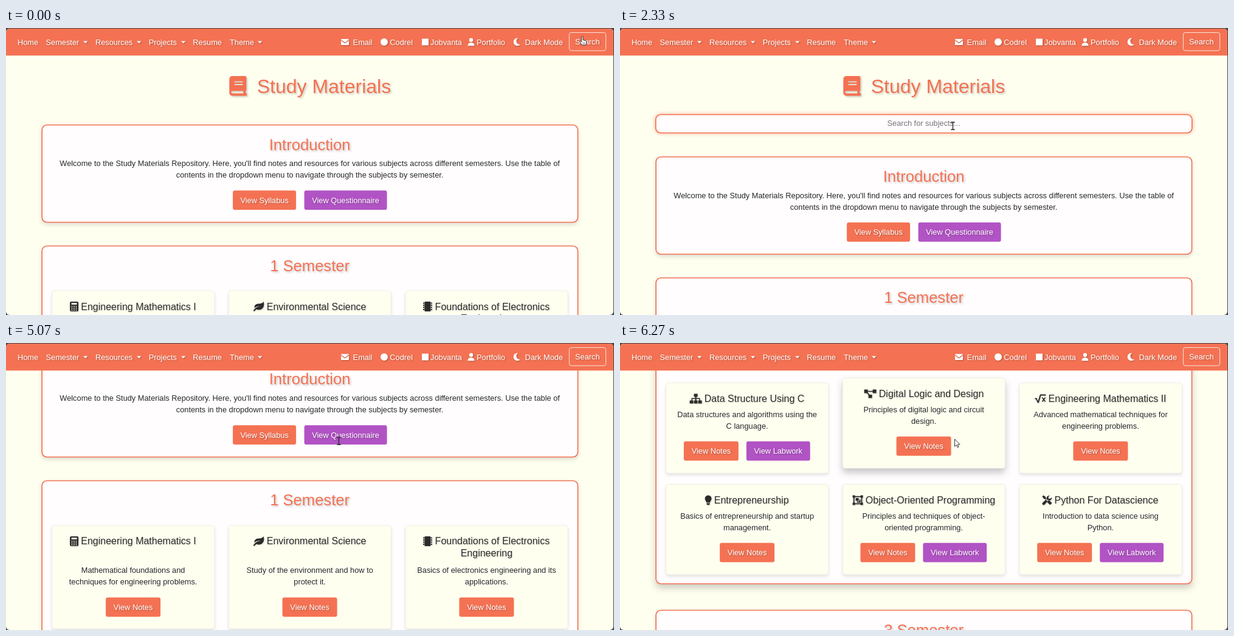
Recreate the animation shown at these times as an HTML page. Size 1000 by 472 pixels, loop 6340 ms.

```html
<!DOCTYPE html>
<html lang="en">
<head>
<meta charset="utf-8">
<title>Study Materials</title>
<style>
  html, body { margin: 0; width: 100%; height: 100%; overflow: hidden; background: #4b4644; }
  svg { display: block; width: 1000px; height: 472px; font: 12.8px "Liberation Sans", Arial, sans-serif; }
  path { fill-rule: evenodd; }
  .mid { text-anchor: middle; }
  .heading { font-size: 25.6px; fill: #f47152; filter: drop-shadow(2px 2px 1.5px rgba(0,0,0,.2)); }
  .big { font-size: 32px; }
  .copy { fill: #26282b; }
  .title { font-size: 16px; fill: #2b2b2b; filter: drop-shadow(1px 1px 1px rgba(0,0,0,.16)); }
  .light { fill: #fff; filter: drop-shadow(1px 1px 1px rgba(0,0,0,.28)); }
  .panel { fill: #fffdfe; stroke: #f47253; stroke-width: 1.7; filter: drop-shadow(0 3px 3px rgba(0,0,0,.14)); }
  .card { fill: #fffff0; stroke: #ecebe0; stroke-width: .8; filter: drop-shadow(0 3px 2.5px rgba(0,0,0,.1)); }
</style>
</head>
<body>
<svg id="stage" viewBox="0 0 1000 472"></svg>
<script>
const LOOP = 6340, FRAME = 1000 / 15;
const ORANGE = '#f47253', PURPLE = '#b153c4';
const SEARCH_SPACE = 52.5;
const CENTER = 499.6;
const COLUMNS = [CENTER - 290.5, CENTER, CENTER + 290.8];

const squares = (xs, ys, size) =>
  xs.map(x => ys.map(y => `M${x} ${y}h${size}v${size}h-${size}z`).join('')).join('');

// Each icon: width, path
const ICONS = {
  book: [28, 'M5 0H26a2 2 0 012 2V22a2 2 0 01-1 2v4a2 2 0 010 4.5H5a5 5 0 01-5-5V5a5 5 0 015-5zM8 8.5v2h14v-2zM8 13v2h14v-2zM5 24.4a2 2 0 000 4H23v-4z'],
  envelope: [13, 'M1 0H12a1 1 0 011 1L6.5 6 0 1a1 1 0 011-1zM0 2.6L6.5 7.4 13 2.6V9a1 1 0 01-1 1H1a1 1 0 01-1-1z'],
  disc: [12, 'M6 0a6 6 0 010 12 6 6 0 010-12z'],
  square: [11, 'M0 0h11v11H0z'],
  user: [11, 'M5.5 0a3.2 3.2 0 010 6.4 3.2 3.2 0 010-6.4zM0 12.8a4.6 4.6 0 014.6-5.2h1.8a4.6 4.6 0 014.6 5.2z'],
  moon: [11, 'M6.5 0A6.4 6.4 0 1011.5 10.5 5.6 5.6 0 017.5.3z'],
  calculator: [14, 'M2 0h10a2 2 0 012 2v12a2 2 0 01-2 2H2a2 2 0 01-2-2V2a2 2 0 012-2zM2.5 2v3h9V2z' + squares([2.5, 6, 9.5], [7, 10, 13], 1.8)],
  leaf: [18, 'M17 0C19 6 17 13 10 13.5c-2 .2-3.5-.3-4.6-1C4 13.5 3 14.5 2 16L0 15C3 10 7 8 12 7.5 8 7 4 8 2 10.5 1.5 6 4.5 4 8 3.6 12 3.4 15 3 17 0z'],
  chip: [16, 'M4 0h8a1 1 0 011 1v14a1 1 0 01-1 1H4a1 1 0 01-1-1V1a1 1 0 011-1z' + squares([.6, 13.4], [1.5, 5, 8.5, 12], 2)],
  sitemap: [20, 'M7 0h6v5h-2v2h6v4h3v5h-6v-5h1.5V8.5H11V11h2v5H7v-5h2V8.5H4.5V11H6v5H0v-5h3V7h6V5H7z'],
  diagram: [20, 'M0 1h6v2.2h8V1h6v6h-6V4.8H6V6l3 3.5h4V15H7v-5L4.3 7H0z'],
  root: [18, 'M0 7h3l2 5L8.5 1H18v2H10L6.3 15H4.5L1.8 9H0zM11 6h2l1.5 2L16 6h2l-2.5 3.5L18 13h-2l-1.5-2-1.5 2h-2l2.5-3.5z'],
  bulb: [11, 'M5.5 0a5.5 5.5 0 015.5 5.5c0 3-2.3 3.6-2.6 6.5H2.6C2.3 9.1 0 8.5 0 5.5A5.5 5.5 0 015.5 0zM2.6 13h5.8a2.9 2.9 0 01-5.8 0z'],
  group: [17, 'M0 0h4v1.2h9V0h4v4h-1.2v8H17v4h-4v-1.2H4V16H0v-4h1.2V4H0zM3 4v8h1v1h9v-1h1V4h-1V3H4v1zM5 4.5h5V9H5zM11 7h2v5H7v-2h4z'],
  tools: [16, 'M0 2L2 0 6 3v2l3 3 2-.5 5 5.2-3 3L7.8 11 8 9 5 6H3zM15.8 3.5A4.5 4.5 0 0110 8.2L4 15.2a2.2 2.2 0 01-3.2-3.2L7.5 6A4.5 4.5 0 0112.3.2L10.2 2.6v3h3z']
};

const icon = (name, x, y) => `<path transform="translate(${x} ${y})" d="${ICONS[name][1]}"/>`;
const text = (x, y, content, style = '') => `<text x="${x}" y="${y}" class="${style}">${content}</text>`;
const box = (x, y, w, h, r, attrs) => `<rect x="${x}" y="${y}" width="${w}" height="${h}" rx="${r}" ${attrs}/>`;
const button = (cx, y, w, label, color = ORANGE) =>
  box(cx - w / 2, y, w, 31.7, 3.2, `fill="${color}"`) + text(cx, y + 20.3, label, 'mid light');

// Card texts are placed around the card's centre line, y runs from the card's top
function card({ col, y, h = 148.5, mark, left, title, copy, lab, id = '' }) {
  const copyTop = h > 150 ? 78.3 : 56;
  const buttonTop = copyTop + 40.2;
  return `<g transform="translate(${COLUMNS[col]} ${y})"><g id="${id}">
    ${box(-133.3, 0, 267, h, 4, 'class="card"')}
    <g class="title">${icon(mark, left, 18)}${text(left + ICONS[mark][0] + 4.2, 31.5, title[0])}
    ${title[1] ? text(0, 50.7, title[1], 'mid') : ''}</g>
    ${copy.map((line, i) => text(0, copyTop + i * 19.2, line, 'mid copy')).join('')}
    ${button(lab ? -59.2 : 0, buttonTop, 90, 'View Notes')}
    ${lab ? button(51.2, buttonTop, 104.8, 'View Labwork', PURPLE) : ''}
  </g></g>`;
}

function panel(y, h, heading, content = '', id = '') {
  return `<g transform="translate(0 ${y})">${box(59.2, 0, 881.3, h, 8, `class="panel" id="${id}"`)}
    ${text(CENTER, 41, heading, 'mid heading')}${content}</g>`;
}

const intro = text(CENTER, 67.7, "Welcome to the Study Materials Repository. Here, you'll find notes and resources for various subjects across different semesters. Use the table of", 'mid copy')
  + text(CENTER, 86.9, 'contents in the dropdown menu to navigate through the subjects by semester.', 'mid copy')
  + button(425.1, 107.8, 104, 'View Syllabus') + button(558.6, 107.8, 136, 'View Questionnaire', PURPLE);

const firstSemester = [
  { col: 0, y: 73.5, h: 170, mark: 'calculator', left: -104, title: ['Engineering Mathematics I'], copy: ['Mathematical foundations and', 'techniques for engineering problems.'] },
  { col: 1, y: 73.5, h: 170, mark: 'leaf', left: -93, title: ['Environmental Science'], copy: ['Study of the environment and how to', 'protect it.'] },
  { col: 2, y: 73.5, h: 170, mark: 'chip', left: -105, title: ['Foundations of Electronics', 'Engineering'], copy: ['Basics of electronics engineering and its', 'applications.'] },
  { col: 0, y: 262, mark: 'bulb', left: -78, title: ['Engineering Physics'], copy: ['Principles of physics for engineering', 'problems.'] },
  { col: 1, y: 262, mark: 'sitemap', left: -82, title: ['Problem Solving'], copy: ['Introduction to algorithms and', 'programming.'], lab: true },
  { col: 2, y: 262, mark: 'tools', left: -92, title: ['Engineering Practice'], copy: ['Basics of tools and workshop', 'techniques.'] }
].map(card).join('');

const secondSemester = [
  { col: 0, y: 73.5, mark: 'sitemap', left: -94.5, title: ['Data Structure Using C'], copy: ['Data structures and algorithms using the', 'C language.'], lab: true },
  { col: 2, y: 73.5, mark: 'root', left: -108, title: ['Engineering Mathematics II'], copy: ['Advanced mathematical techniques for', 'engineering problems.'] },
  { col: 0, y: 240.5, mark: 'bulb', left: -69.5, title: ['Entrepreneurship'], copy: ['Basics of entrepreneurship and startup', 'management.'] },
  { col: 1, y: 240.5, mark: 'group', left: -117, title: ['Object-Oriented Programming'], copy: ['Principles and techniques of object-', 'oriented programming.'], lab: true },
  { col: 2, y: 240.5, mark: 'tools', left: -96, title: ['Python For Datascience'], copy: ['Introduction to data science using', 'Python.'], lab: true },
  { col: 1, y: 73.5, mark: 'diagram', left: -98, title: ['Digital Logic and Design'], copy: ['Principles of digital logic and circuit', 'design.'], id: 'hoverCard' }
].map(card).join('');

const menu = [[19, 'Home'], [65.5, 'Semester', 127], [147, 'Resources', 215], [234.7, 'Projects', 288], [307.3, 'Resume'], [368, 'Theme', 414]]
  .map(([x, label, caret]) => text(x, 27.7, label) + (caret ? `<path d="M${caret} 21.4h7.4l-3.7 3.8z"/>` : '')).join('');
const links = [['envelope', 551, 18, 570.6, 'Email'], ['disc', 616, 17, 631.3, 'Codrel'], ['square', 684, 17.5, 698, 'Jobvanta'],
  ['user', 759.5, 16.5, 774, 'Portfolio'], ['moon', 834.5, 16.5, 853.5, 'Dark Mode']]
  .map(([mark, x, y, textX, label]) => icon(mark, x, y) + text(textX, 27.7, label)).join('');

const results = ['Digital Logic and Design', 'Analysis and Design of Algorithm', 'Independent Project', 'Predictive Modelling and Analytics', 'Deep Learning']
  .map((name, i) => text(498, 198.6 + i * 35.5, name, 'mid')
    + `<path d="M58.5 ${212 + i * 35.5}H939" stroke="#e4e2e4" stroke-width=".8"/>`).join('');

const stage = document.getElementById('stage');
stage.innerHTML = `
<clipPath id="window"><rect y="1" width="999" height="471" rx="6"/></clipPath>
<g clip-path="url(#window)">
  <rect width="1000" height="472" fill="#fffff0"/>
  <g id="page">
    <g class="heading big">${icon('book', 367.3, 79)}${text(412.7, 107.2, 'Study Materials')}</g>
    <g id="below">
      ${panel(212, 160, 'Introduction', intro)}
      ${panel(411, 426, '1 Semester', firstSemester)}
      ${panel(877, 404, '2 Semester', secondSemester, 'hoverPanel')}
      ${panel(1324.5, 404, '3 Semester')}
    </g>
    <g id="search">
      ${box(58.8, 142.5, 882, 30, 8, 'id="field" fill="#fffdfe"')}
      <text id="query" class="mid" x="${CENTER}" y="161.4"></text>
    </g>
    <g id="dropdown">
      ${box(58.5, 177, 880.5, 177, 0, 'fill="#fffdfe" style="filter:drop-shadow(0 3px 3px rgba(0,0,0,.1))"')}${results}
    </g>
  </g>
  <rect width="1000" height="45.3" fill="${ORANGE}"/>
  <g class="light">${menu}${links}</g>
  ${box(924.6, 5.9, 63.8, 33.6, 5, 'id="ring" fill="none" stroke="#fff" stroke-opacity=".6" stroke-width="3"')}
  ${box(926.4, 7.5, 60.2, 29.8, 3.5, 'fill="none" stroke="#fbe3db"')}
  <text id="searchLabel" class="mid light" x="956.3" y="26.6">Search</text>
</g>
<g id="hand"><path d="M-1.2.8a1.2 1.2 0 012.4 0v5l4 .8a2 2 0 011.5 2L6 14H-.6L-4 9.2c-.8-1.3.6-2.2 1.6-1.2l1.2 1.2z" fill="#fff" stroke="#222" stroke-width=".9"/><path d="M1.2 9.5v3M3.4 9.5v3" stroke="#222" stroke-width=".7"/></g>
<g id="arrow"><path d="M0 0V12.2l2.8-2.6 1.9 4.2 1.9-.9-1.9-4H8.6z" fill="#fff" stroke="#222" stroke-width=".9"/></g>
<g id="beam"><path d="M-3.2-6H-.7L0-5.3.7-6H3.2M0-5.3V5.3M-3.2 6H-.7L0 5.3.7 6H3.2" fill="none" stroke="#222" stroke-width="1.3"/></g>`;

const el = Object.fromEntries([...stage.querySelectorAll('[id]')].map(node => [node.id, node]));
const show = (node, visible) => node.style.display = visible ? '' : 'none';
const shift = (node, x, y) => node.setAttribute('transform', `translate(${x} ${y})`);
const progress = (t, from, to) => Math.min(1, Math.max(0, (t - from) / (to - from)));
const easeInOut = u => (1 - Math.cos(Math.PI * u)) / 2;

const CLICK_SEARCH = 270, CLICK_FIELD = 1300, TYPE_D = 3270, TYPE_E = 3450;
const SUBMIT = 4846, SCROLL_END = 5577, HOVER = 5680;

function pointer(t) {
  const leave = progress(t, 350, 800) ** 2;
  const arrive = 1 - (1 - progress(t, 800, 1200)) ** 2;
  const nudge = progress(t, HOVER, HOVER + 100);
  return [948 - 240 * leave - 160.5 * arrive + 3 * nudge, 14 + 77 * leave + 70 * arrive - 3 * nudge];
}

function render(t) {
  const open = t >= CLICK_SEARCH, focused = t >= CLICK_FIELD && t < SUBMIT;
  const buttonFocused = open && t < CLICK_FIELD;
  const typed = t < TYPE_D ? '' : t < TYPE_E ? 'd' : 'de';

  shift(el.page, 0, -885 * easeInOut(progress(t, SUBMIT, SCROLL_END)));
  shift(el.below, 0, open ? 0 : -SEARCH_SPACE);
  show(el.search, open);
  show(el.ring, buttonFocused);
  el.searchLabel.style.opacity = buttonFocused ? .55 : 1;

  el.field.setAttribute('stroke', focused ? ORANGE : '#cfcbd0');
  el.field.setAttribute('stroke-width', focused ? 1.7 : .9);
  el.field.style.filter = focused ? 'drop-shadow(0 0 3px rgba(244,114,83,.6))' : 'drop-shadow(0 3px 3px rgba(0,0,0,.12))';
  el.query.textContent = typed || 'Search for subjects...';
  el.query.setAttribute('fill', typed ? '#555' : '#77747a');
  show(el.dropdown, typed && t < SUBMIT);

  const hover = easeInOut(progress(t, HOVER, HOVER + 300));
  shift(el.hoverCard, 0, -8 * hover);
  el.hoverCard.firstElementChild.style.filter =
    `drop-shadow(0 ${3 + 4 * hover}px ${2.5 + 3.5 * hover}px rgba(0,0,0,${.1 + .12 * hover}))`;
  el.hoverPanel.style.filter =
    `drop-shadow(0 ${3 + 3 * hover}px ${3 + 3 * hover}px rgba(0,0,0,${.14 + .06 * hover}))`;

  const [x, y] = pointer(t);
  const shape = x > 926 && y < 38 ? 'hand' : y > 142 && t < HOVER ? 'beam' : 'arrow';
  for (const name of ['hand', 'arrow', 'beam']) show(el[name], name === shape);
  shift(el[shape], x, y);
}

function tick() {
  const t = performance.now() % LOOP;
  render(Math.floor((t + 4) / FRAME) * FRAME);
  requestAnimationFrame(tick);
}
tick();
</script>
</body>
</html>
```
